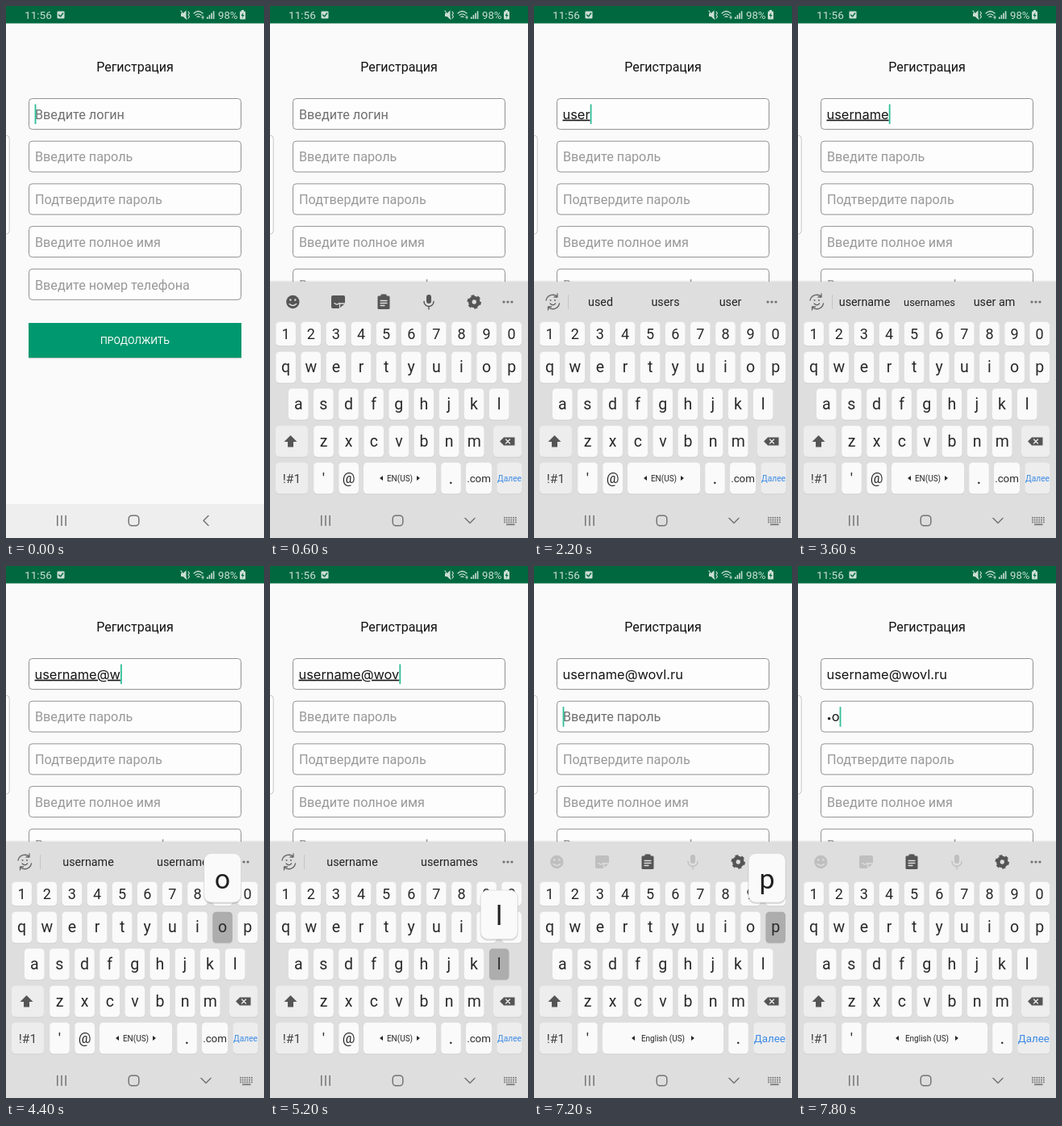
An HTML page that plays this animation: 320 px wide and 658 px high, repeating every 8000 ms.

```html
<!DOCTYPE html>
<html lang="ru">
<head>
<meta charset="utf-8">
<style>
html, body { margin: 0; width: 100%; height: 100%; overflow: hidden; background: #fafafb; }
svg { display: block; width: 320px; height: 658px; }
text { font-family: Roboto, "Noto Sans", sans-serif; white-space: pre; }
.typed { font-family: Inter, "Open Sans", sans-serif; font-size: 16.4px; fill: #151515; }
.under { text-decoration: underline; text-decoration-thickness: 1px; text-decoration-skip-ink: none; }
</style>
</head>
<body>
<svg id="stage" viewBox="0 0 320 658"></svg>
<script>
const NS = 'http://www.w3.org/2000/svg';
const stage = document.getElementById('stage');
const LOOP = 8000;

function el(parent, tag, attrs, content) {
  const node = document.createElementNS(NS, tag);
  for (const name in attrs) node.setAttribute(name, attrs[name]);
  if (content !== undefined) node.textContent = content;
  return parent.appendChild(node);
}
const group = parent => el(parent, 'g', {});
const box = (parent, x, y, width, height, rx, fill, more) =>
  el(parent, 'rect', { x, y, width, height, rx, fill, ...more });
const label = (parent, x, y, str, size, fill, anchor = 'middle') =>
  el(parent, 'text', { x, y, 'font-size': size, fill, 'text-anchor': anchor }, str);
const line = (parent, d, stroke, width = 1.2, more) =>
  el(parent, 'path', { d, stroke, 'stroke-width': width, fill: 'none', 'stroke-linecap': 'round', 'stroke-linejoin': 'round', ...more });
const shape = (parent, d, fill) => el(parent, 'path', { d, fill, 'fill-rule': 'evenodd' });
const dot = (parent, cx, cy, r, fill, more) => el(parent, 'circle', { cx, cy, r, fill, ...more });
const show = (node, on) => { node.style.display = on ? '' : 'none'; };

// Page
box(stage, 0, 0, 320, 658, 0, '#fafafb');
label(stage, 160, 81.3, 'Регистрация', 16, '#111');

const hints = ['Введите логин', 'Введите пароль', 'Подтвердите пароль', 'Введите полное имя', 'Введите номер телефона']
  .map((hint, i) => {
    const y = 114.5 + i * 52.7;
    box(stage, 28.5, y, 263, 38, 4, '#fdfdfd', { stroke: '#929292' });
    return label(stage, 36, y + 25.2, hint, 16.2, '#999', 'start');
  });
const login = el(stage, 'text', { x: 35.5, y: 139.6, class: 'typed under' });
const pass = el(stage, 'text', { x: 35.5, y: 192.3, class: 'typed' });
const caret = box(stage, 0, 0, 1.8, 24.5, 0, '#2fbd98');

box(stage, 28, 393, 264, 43.3, 1, '#000', { opacity: 0.18 });
box(stage, 28, 392, 264, 43, 0, '#00986e');
label(stage, 160, 418, 'ПРОДОЛЖИТЬ', 12.3, '#fff');
box(stage, -6, 160, 10.2, 122, 4, '#fdfdfd', { stroke: '#c9c9c9' });

// Status bar
const pale = '#c9ddd3';
box(stage, 0, 0, 320, 21.5, 0, '#00683f');
label(stage, 23, 15.7, '11:56', 13.6, pale, 'start');
box(stage, 63.5, 6.5, 9, 9, 1, pale);
line(stage, 'M65.5 11l2 2 3.2-4', '#00683f', 1.3);
shape(stage, 'M217 9h2.5l4-3.5v11l-4-3.5h-2.5z', pale);
line(stage, 'M217 6l7 10M226 7l1.5 2-1.5 2 1.5 2-1.5 2', pale, 1.2);
line(stage, 'M233 9q5.5-5 11 0M235 11.3q3.5-3 7 0M237 13.5q1.5-1.4 3 0', pale, 1.2);
line(stage, 'M244 12v4M242.5 14h3', pale, 1);
for (let i = 0; i < 4; i++) box(stage, 249 + i * 2.6, 13.5 - i * 2.4, 1.6, 2.5 + i * 2.4, 0, pale);
label(stage, 263, 15.7, '98%', 13.2, pale, 'start');
box(stage, 290, 6.5, 7, 10, 1, pale);
box(stage, 292, 5, 3, 2, 0, pale);
shape(stage, 'M294.5 8l-3 4h2l-.8 3 3-4h-2z', '#00683f');

// Keyboard
box(stage, 0, 616, 320, 42, 0, '#eee');
const kb = group(stage);
box(kb, 0, 339.5, 320, 2, 0, '#000', { opacity: 0.06 });
box(kb, 0, 341, 320, 317, 0, '#dedede');

const INK = '#292929', FACE = '#fafafa', SIDE = '#ededed';
const keys = {};
function key(parent, id, cx, cy, w, h, fill = FACE) {
  box(parent, cx - w / 2, cy - h / 2 + 1, w, h, 4.5, '#000', { opacity: 0.07 });
  keys[id] = { x: cx, y: cy, fill, rect: box(parent, cx - w / 2, cy - h / 2, w, h, 4.5, fill) };
}
function row(chars, x, y, h, size) {
  [...chars].forEach((ch, i) => {
    key(kb, ch, x + i * 31.12, y, 24.6, h);
    label(kb, x + i * 31.12, y + 6.3, ch, size, INK);
  });
}
row('1234567890', 19.6, 405.5, 29.5, 18);
row('qwertyuiop', 19.6, 447, 38.5, 19.5);
row('asdfghjkl', 35.2, 492.5, 38.5, 19.5);
row('zxcvbnm', 66.5, 538.5, 38.5, 19.5);

key(kb, 'shift', 27, 538.5, 40, 38.5, SIDE);
shape(kb, 'M25.5 531l8 8h-4.5v6.5h-7V539h-4.500z', '#555');
key(kb, 'del', 294.5, 538.5, 35, 38.5, SIDE);
shape(kb, 'M285 538.500l5-5h13.500v10h-13.500z', '#555');
line(kb, 'M292.500 536l5 5m0-5l-5 5', '#eee', 1.3);
key(kb, 'sym', 27, 584, 40, 38.5, SIDE);
label(kb, 27, 589.5, '!#1', 15.5, '#444');
key(kb, "'", 66.5, 584, 24.6, 38.5);
label(kb, 66.5, 590.5, "'", 19, INK);

function space(parent, x, w, str, size, gap) {
  key(parent, str, x, 584, w, 38.5);
  label(parent, x, 587.5, str, size, INK);
  shape(parent, `M${x - gap} 581v6l-4-3zM${x + gap} 581v6l4-3z`, INK);
}
const mailRow = group(kb), passRow = group(kb);
key(mailRow, '@', 97.700, 584, 24.6, 38.5);
label(mailRow, 97.7, 590, '@', 17.5, INK);
space(mailRow, 161, 90, 'EN(US)', 10, 21);
key(mailRow, '.', 224.5, 584, 24.6, 38.5);
label(mailRow, 224.5, 591, '.', 22, INK);
key(mailRow, '.com', 259, 584, 32, 38.5);
label(mailRow, 259, 588.5, '.com', 13.3, INK);
key(mailRow, 'next', 297, 584, 31, 38.5, SIDE);
label(mailRow, 297, 587.5, 'Далее', 10.2, '#3a8ae6');
space(passRow, 160, 150, 'English (US)', 10, 35);
key(passRow, 'dot', 253.5, 584, 24.6, 38.5);
label(passRow, 253.5, 591, '.', 22, INK);
key(passRow, 'go', 292.300, 584, 40, 38.5, SIDE);
label(passRow, 292.3, 588.5, 'Далее', 13.300, '#3a8ae6');

// Tool and suggestion bars
for (let i = 0; i < 3; i++) dot(kb, 290 + i * 5, 366, 1.6, '#707070');
const tools = group(kb), words = group(kb);
const faded = group(tools);
faded.setAttribute('fill', '#555');
dot(faded, 28.3, 366, 8.2, 'inherit');
dot(faded, 25.3, 363.5, 1.2, '#dedede');
dot(faded, 31.3, 363.500, 1.2, '#dedede');
line(faded, 'M24 368.500q4.300 4 8.600 0', '#dedede', 1.4);
shape(faded, 'M78 358h13a2 2 0 0 1 2 2v8l-7 6h-8a2 2 0 0 1-2-2v-12a2 2 0 0 1 2-2z', 'inherit');
line(faded, 'M80 367.500q3 3 6 0M86.500 374v-6h6.500', '#dedede', 1.3);
box(faded, 194, 357, 6, 11, 3, 'inherit');
line(faded, 'M191 365.500a6 6 0 0 0 12 0M197 372v3', '#555', 1.4);
box(tools, 133.5, 358.500, 15, 16.5, 1.5, '#555');
box(tools, 137.500, 356.500, 7, 4, 1, '#555');
line(tools, 'M137 364.500h8M137 367.500h8M137 370.500h5', '#dedede', 1.3);
dot(tools, 253.3, 366, 5, 'none', { stroke: '#555', 'stroke-width': 4.6 });
dot(tools, 253.3, 366, 7.4, 'none', { stroke: '#555', 'stroke-width': 2.6, 'stroke-dasharray': '3.87' });

line(words, 'M42.500 357.500v17', '#c4c4c4', 1);
line(words, 'M15 364a8.500 8.500 0 0 1 14-4.500M29 356v4h-4M31.500 368a8.500 8.500 0 0 1-14 4.500M17.500 376v-4h4M20 368q3.300 3.500 6.600 0', '#666', 1.3);
dot(words, 20.5, 364, 1, '#666');
dot(words, 26, 364, 1, '#666');
const slots = [0, 1, 2].map(() => label(words, 0, 371.3, '', 14.3, '#222'));

// Key preview
const popup = group(kb);
box(popup, -23.5, -90.5, 47, 61.5, 9, '#000', { opacity: 0.12 });
box(popup, -23, -91.5, 46, 60.5, 9, FACE, { stroke: '#d2d2d2', 'stroke-width': 0.6 });
const popupChar = label(popup, 0, -48.5, '', 34, '#202020');

// Navigation bar
for (let i = 0; i < 3; i++) box(stage, 63 + i * 5.2, 630, 1.5, 13, 0, '#747474');
box(stage, 152.2, 630.2, 12.6, 12.6, 4, 'none', { stroke: '#747474', 'stroke-width': 1.5 });
const back = line(stage, 'M251 630.500l-6 6 6 6', '#747474', 1.5);
const kbIcon = group(stage);
for (let i = 0; i < 18; i++) box(kbIcon, 290 + (i % 6) * 2.8, 632 + Math.floor(i / 6) * 2.8, 1.7, 1.7, 0, '#747474');
box(kbIcon, 293, 640.5, 10.5, 1.7, 0, '#747474');

// Each step: time and what changes then; the rest carries over.
const W1 = ['us', 'UTF-8', 'updated'], W2 = ['use', 'us', 'used'], W3 = ['used', 'users', 'user'];
const W4 = ['username', 'usernames', 'user am'], W5 = ['username', 'usernames'];
const MAIL = 'username@wovl.ru';
const steps = [
  [0, { n: 0, pw: '', press: '', words: null, caret: 1, slide: 317, focus: 0, secret: 0 }],
  [200, { slide: 130 }],
  [400, { slide: 0 }],
  [600, { caret: 0 }],
  [1000, { caret: 1, press: 'u' }],
  [1200, { n: 1, press: 's' }],
  [1400, { n: 2, press: 'e', words: W1 }],
  [1600, { n: 3, press: '' }],
  [1800, { press: 'r', words: W2 }],
  [2000, { n: 4, press: '' }],
  [2200, { words: W3 }],
  [2400, { press: 'n' }],
  [2600, { n: 5, press: '' }],
  [2800, { n: 6, press: 'm' }],
  [3000, { n: 7, press: '' }],
  [3200, { press: 'e' }],
  [3400, { n: 8, press: '' }],
  [3600, { words: W4 }],
  [3800, { caret: 0 }],
  [4000, { n: 9, caret: 1, words: W5 }],
  [4200, { press: MAIL[9] }],
  [4400, { n: 10, press: MAIL[10] }],
  [4600, { n: 11, press: '' }],
  [4800, { press: MAIL[11] }],
  [5000, { n: 12, press: '' }],
  [5200, { press: MAIL[12] }],
  [5400, { n: 14, press: '' }],
  [5600, { press: 'r' }],
  [5800, { n: 15, press: 'u' }],
  [6000, { n: 16, press: '' }],
  [6400, { words: [MAIL] }],
  [6600, { press: 'next' }],
  [6800, { press: '', focus: 1, words: null }],
  [7000, { secret: 1 }],
  [7200, { press: 'p' }],
  [7400, { pw: 'p', press: '' }],
  [7600, { press: 'o' }],
  [7800, { pw: '•o', press: '' }]
];
let carried = {};
const states = steps.map(([at, change]) => (carried = { ...carried, ...change, at }));

const columns = { 1: [162], 2: [102, 222.5], 3: [82.5, 163, 243.5] };

function draw(s) {
  login.textContent = MAIL.slice(0, s.n);
  login.classList.toggle('under', !s.focus);
  pass.textContent = '';
  for (const ch of s.pw) el(pass, 'tspan', ch === '•' ? { style: 'font-size:11px' } : {}, ch);
  show(hints[0], !s.n);
  show(hints[1], !s.pw);
  hints.forEach((hint, i) => hint.setAttribute('fill', i === s.focus ? '#707070' : '#999'));

  const width = (s.focus ? pass : login).getComputedTextLength();
  caret.setAttribute('x', 35.6 + width);
  caret.setAttribute('y', 121.5 + s.focus * 52.7);
  show(caret, s.caret);

  kb.setAttribute('transform', `translate(0 ${s.slide})`);
  show(kb, s.slide < 317);
  show(kbIcon, s.slide < 317);
  back.setAttribute('transform', s.slide < 317 ? 'rotate(-90 248 636.5)' : '');
  show(mailRow, !s.secret);
  show(passRow, s.secret);
  show(tools, !s.words);
  show(words, s.words);
  faded.setAttribute('opacity', s.focus ? 0.22 : 1);
  slots.forEach((slot, i) => {
    const word = s.words && s.words[i] || '';
    slot.textContent = word;
    if (!word) return;
    slot.setAttribute('x', columns[s.words.length][i]);
    slot.setAttribute('font-size', s.words.length === 3 && word.length > 8 ? 12.9 : 14.3);
  });

  for (const id in keys) keys[id].rect.setAttribute('fill', id === s.press ? '#adadad' : keys[id].fill);
  const preview = s.press.length === 1;
  show(popup, preview);
  if (preview) {
    const { x, y } = keys[s.press];
    popup.setAttribute('transform', `translate(${Math.min(289, Math.max(31, x))} ${y})`);
    popupChar.textContent = s.press;
  }
}

let current;
function tick() {
  const t = performance.now() % LOOP;
  const state = states.findLast(s => s.at <= t);
  if (state !== current) draw(current = state);
  requestAnimationFrame(tick);
}
tick();
</script>
</body>
</html>
```
